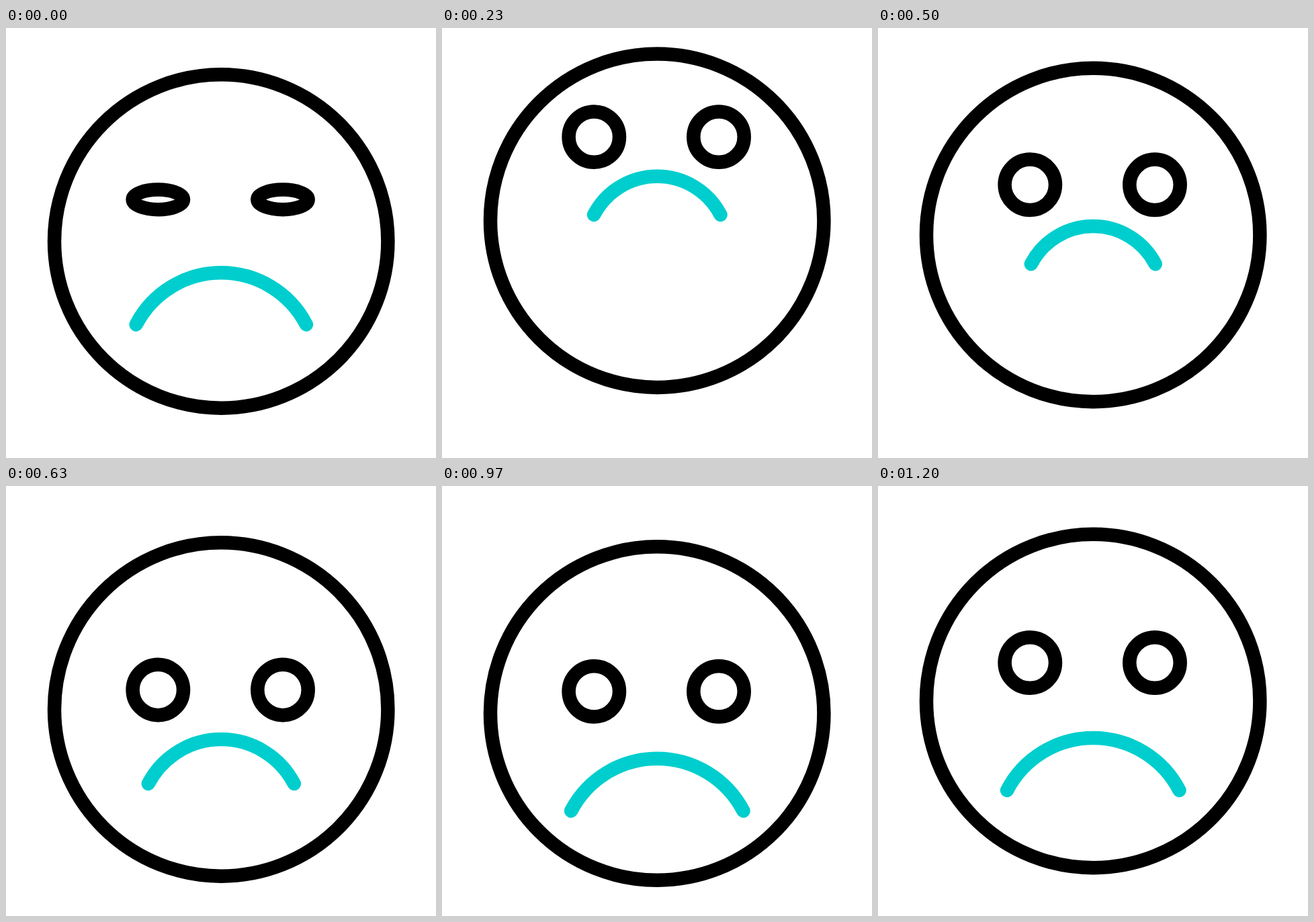
Write an HTML page without scripts that moves like this. It is 640 px wide and 640 px high and loops after 1670 ms.

```html
<!DOCTYPE html>
<html lang="en">
<head>
<meta charset="utf-8">
<title>Sad face</title>
<style>
  :root {
    --ease: cubic-bezier(.167, 0, .833, 1);
    /* the same ease, joined just after its start */
    --lead: cubic-bezier(.286, .242, .842, 1);
  }
  html, body {
    margin: 0;
    width: 100%;
    height: 100%;
    overflow: hidden;
    background: #fff;
  }
  svg {
    display: block;
    width: 100%;
    height: 100%;
    fill: none;
    stroke: #000;
    stroke-width: 20.5;
    stroke-linecap: round;
  }
  .head, .eyes, .eyes ellipse, .mouth {
    animation: 1670ms var(--ease) infinite;
  }
  .head { animation-name: head; }
  .eyes { animation-name: look; }
  .eyes ellipse { animation-name: blink; }
  .mouth {
    animation-name: nod, shrink;
    transform-origin: 320.3px 375px;
    stroke: #00cece;
    vector-effect: non-scaling-stroke;
  }

  @keyframes head {
    0% { translate: 0 -2.5px; animation-timing-function: var(--lead); }
    20.4% { translate: 0 -35.6px; }
    46.9% { translate: 0 34.5px; }
    70.9%, 100% { translate: 0 0; }
  }
  @keyframes look {
    0% { translate: 0 -7.5px; animation-timing-function: var(--lead); }
    19.5% { translate: 0 -106.3px; }
    44.9% { translate: 0 87px; }
    71%, 100% { translate: 0 0; }
  }
  @keyframes nod {
    0% { translate: 0 -10.5px; animation-timing-function: var(--lead); }
    20% { translate: 0 -164px; }
    45.4% { translate: 0 61.4px; }
    70.8%, 100% { translate: 0 0; }
  }
  @keyframes shrink {
    0% { scale: .988; animation-timing-function: var(--lead); }
    26.2% { scale: .683; }
    48.8%, 100% { scale: 1; }
  }
  @keyframes blink {
    0% { ry: 15.5px; animation-timing-function: ease-out; }
    2% { ry: 1px; }
    6%, 100% { ry: 37.7px; }
  }
</style>
</head>
<body>
<svg viewBox="0 0 640 640">
  <circle class="head" cx="320.2" cy="320" r="248.2"/>
  <g class="eyes">
    <ellipse cx="226.3" cy="263" rx="37.7" ry="37.7"/>
    <ellipse cx="412" cy="263" rx="37.7" ry="37.7"/>
  </g>
  <path class="mouth" d="M192.1 453A144.4 144.4 0 0 1 448.5 453"/>
</svg>
</body>
</html>
```
